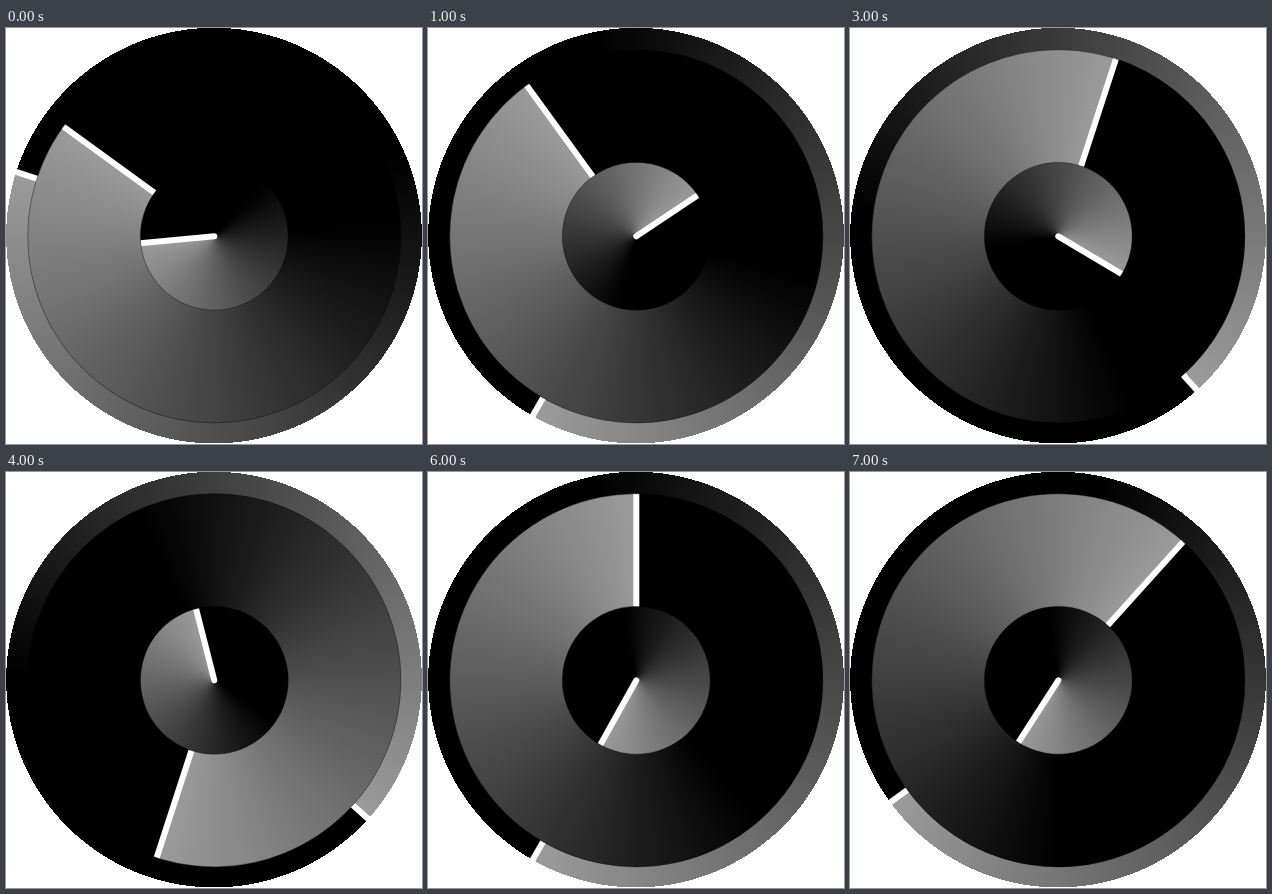
Recreate the animation shown at these times as an HTML page with a canvas. Size 416x416 px, loop 8000 ms.

```html
<!DOCTYPE html>
<html lang="en">
<head>
<meta charset="utf-8">
<title>Radial clock</title>
<style>
html, body { margin: 0; width: 100%; height: 100%; overflow: hidden; background: #fff; }
canvas { display: block; }
</style>
</head>
<body>
<canvas id="clock" width="416" height="416"></canvas>
<script>
const ctx = document.getElementById('clock').getContext('2d');
const SIZE = 416;
const CENTER = 208.3;
const STEP = 1000;
const FADE = 222 / 360; // share of the turn lit behind each hand

// hours, minutes, seconds
const times = [
  [8, 51, 48], [1, 54, 35], [2, 9, 35], [4, 3, 23],
  [11, 33, 22], [7, 19, 40], [7, 0, 35], [7, 7, 39]
];

// Whole-pixel rows give the face a hard, unsmoothed edge.
function facePath() {
  const path = new Path2D();
  for (let y = 0; y < SIZE; y++) {
    const half = Math.round(Math.sqrt(Math.max(0, 207.8 ** 2 - (y - 207.1) ** 2)));
    if (half) path.rect(SIZE / 2 - half, y, 2 * half, 1);
  }
  return path;
}
const face = facePath();

function disc(radius, degrees) {
  ctx.save();
  ctx.translate(CENTER, CENTER);
  ctx.rotate((degrees - 90) * Math.PI / 180);
  ctx.beginPath();
  ctx.arc(0, 0, radius, 0, 2 * Math.PI);
  const fill = ctx.createConicGradient(0, 0, 0);
  fill.addColorStop(0, '#000');
  fill.addColorStop(1 - FADE, '#000');
  fill.addColorStop(1, '#9b9b9b');
  ctx.fillStyle = fill;
  ctx.fill();
  ctx.clip();

  ctx.beginPath();
  ctx.moveTo(0, 0);
  ctx.lineTo(radius + 5, 0);
  ctx.lineWidth = 6;
  ctx.lineCap = 'round';
  ctx.strokeStyle = '#fff';
  ctx.stroke();
  ctx.restore();
}

function rim(radius) {
  ctx.beginPath();
  ctx.arc(CENTER, CENTER, radius, 0, 2 * Math.PI);
  ctx.lineWidth = 1;
  ctx.strokeStyle = 'rgba(0, 0, 0, 0.4)';
  ctx.stroke();
}

function draw(now) {
  const [h, m, s] = times[Math.floor(now / STEP) % times.length];
  ctx.clearRect(0, 0, SIZE, SIZE);
  ctx.save();
  ctx.clip(face);
  disc(210, s * 6);
  disc(186.6, m * 6);
  rim(186.6);
  disc(73.9, h * 30 + m / 2 - 0.8);
  rim(73.9);
  ctx.restore();
}

const start = performance.now();
function tick() {
  draw(performance.now() - start);
  requestAnimationFrame(tick);
}
tick();
</script>
</body>
</html>
```
